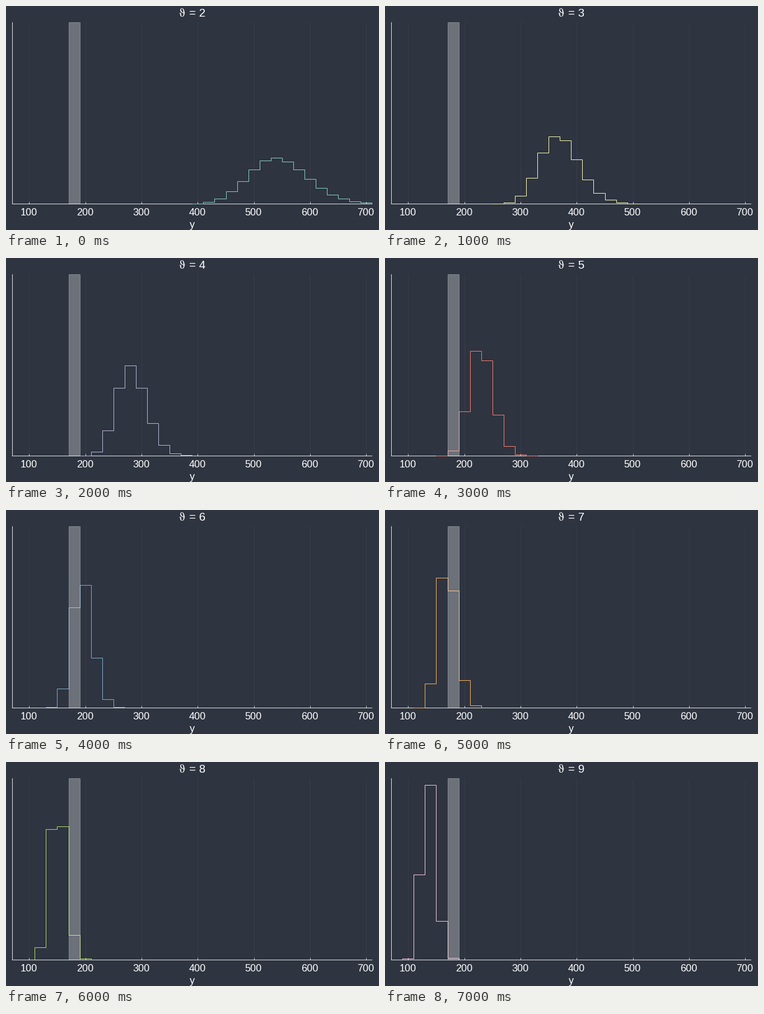
A matplotlib script for the animation above (8 s loop, 666 px wide and 400 px high).

```python
import math

import matplotlib.pyplot as plt
from matplotlib.animation import FuncAnimation
from matplotlib.patches import Rectangle

W, H, DPI = 666, 400, 100
PX = 72 / DPI                      # one pixel in points
LEFT, RIGHT, TOP, BASE = 11.2, 653.4, 29, 353.3
Y_MIN, Y_MAX, BIN = 70, 710, 20
TOTAL = 540                        # summed bar height in pixels
SPREAD = 0.1                       # relative noise of the model
BG, FG = "#2e3440", "#ffffff"
COLORS = ["#8dd3c7", "#ffffb3", "#bebada", "#fb8072",
          "#80b1d3", "#fdb462", "#b3de69", "#fccde5"]

plt.rcParams["font.family"] = "Liberation Sans"


def sx(y):
    """Horizontal pixel of a data value."""
    return LEFT + (y - Y_MIN) * (RIGHT - LEFT) / (Y_MAX - Y_MIN)


def cdf(y, theta):
    """Log-normal signal of median 1047 / theta over an offset of 20."""
    z = math.log((y - 20) * theta / 1047) / SPREAD
    return 0.5 * (1 + math.erf(z / math.sqrt(2)))


def outline(theta):
    """Corner points of the step histogram, from baseline to baseline."""
    xs, ys = [], []
    for a in range(Y_MIN, Y_MAX + BIN, BIN):
        h = TOTAL * (cdf(a + BIN, theta) - cdf(a, theta))
        if h > 0.2:
            xs += [sx(a), sx(a + BIN)]
            ys += [BASE - h] * 2
    return [xs[0], *xs, xs[-1]], [BASE, *ys, BASE]


fig = plt.figure(figsize=(W / DPI, H / DPI), dpi=DPI, facecolor=BG)
ax = fig.add_axes([0, 0, 1, 1])
ax.set_xlim(0, W)
ax.set_ylim(H, 0)
ax.axis("off")


def line(xs, ys, color, z, **kw):
    return ax.plot(xs, ys, color=color, lw=PX, zorder=z,
                   solid_joinstyle="miter", **kw)[0]


def label(x, y, s, size, **kw):
    return ax.text(x, y, s, color=FG, fontsize=size * PX, va="baseline", **kw)


for v in range(100, 800, 100):
    line([sx(v)] * 2, [TOP, BASE], "#3b3d49", 1)
    line([sx(v)] * 2, [BASE - 3, BASE], FG, 2, alpha=0.8)
    label(sx(v) - 0.8, 373.5, str(v), 18, ha="center")

line([LEFT] * 2, [TOP, BASE], FG, 2, alpha=0.9)
line([LEFT, RIGHT], [BASE] * 2, FG, 2, alpha=0.9)

steps = line([], [], FG, 3)
steps.set_clip_path(Rectangle((LEFT, TOP), RIGHT - LEFT + 1, BASE - TOP + 1,
                              transform=ax.transData))

# Observed interval, drawn as a translucent veil over the histogram
x0, x1 = sx(170), sx(190)
ax.add_patch(Rectangle((x0, TOP), x1 - x0, BASE - TOP, fc=(1, 1, 1, 0.3),
                       ec=(1, 1, 1, 0.3), lw=PX, zorder=4))

label(332.5, 396, "y", 18, ha="center")
label(308.5, 19, r"$\mathrm{\vartheta}$", 21, ha="left",
      math_fontfamily="stix")
title = label(356, 19, "", 20.5, ha="right")


def update(i):
    theta = i + 2
    steps.set_data(*outline(theta))
    steps.set_color(COLORS[i])
    title.set_text(f"= {theta}")
    return steps, title


anim = FuncAnimation(fig, update, frames=len(COLORS), interval=1000,
                     repeat=True, repeat_delay=0)
plt.show()
```
